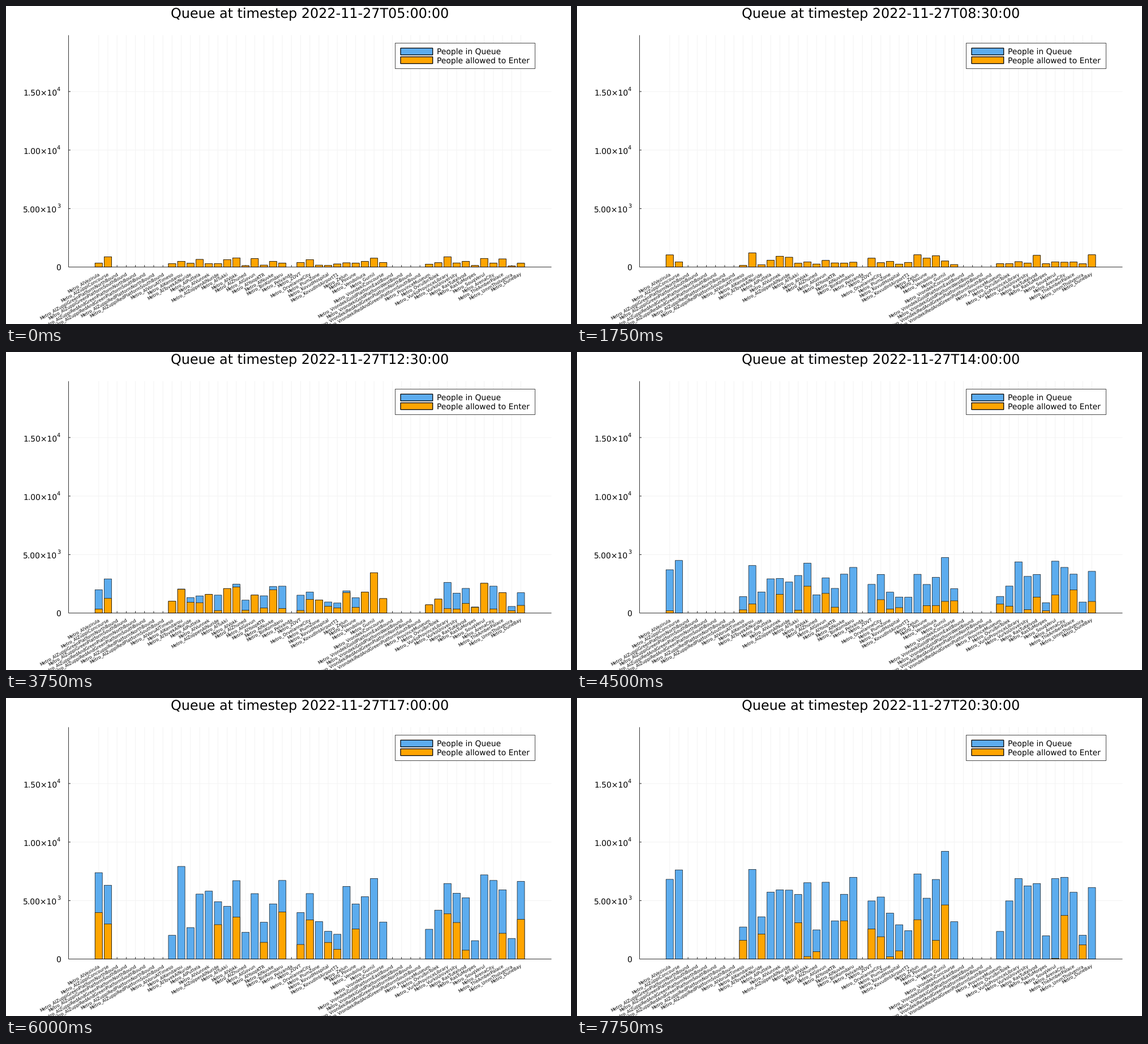
Recreate the animation shown at these times as a matplotlib script. Size 998x561 px, loop 8000 ms.

```python
import matplotlib.pyplot as plt
import numpy as np
from matplotlib.animation import FuncAnimation
from matplotlib.patches import Rectangle

W, H, DPI = 998, 561, 64
PT = 72 / DPI                      # points per pixel
FRAMES, INTERVAL = 32, 250
LEFT, RIGHT, TOP, BASE = 110.5, 963.5, 51.5, 460.5
FIRST_X, STEP_X, BAR_W = 163.7, 16.213, 12.97
PX_PER_PERSON = 103.2 / 5000
BLUE, ORANGE, GRID = "#5cacee", "#ffa500", "#f3f3f3"

plt.rcParams["font.family"] = "DejaVu Sans"
plt.rcParams["text.hinting"] = "no_hinting"
plt.rcParams["path.snap"] = False


def platforms(stop, *lines):
    """Platforms are listed on the axis but carry no passengers."""
    return {f"{stop}{line}Platform{side}Bound": 0
            for line, sides in lines for side in sides}


NS, EW = ("North", "South"), ("East", "West")

# station -> usual evening crowd, in hundreds of people
STATIONS = {
    "AlVezirula": 66, "AlZuppiConcourse": 67,
    **platforms("AlZuppi", ("Green", NS), ("RedAndGreen", NS), ("Red", NS)),
    "AlVoruAlTimeso": 22, "AlKendarou": 71, "AlTovekAlNuride": 29,
    "AlPuttela": 50, "AlVunnek": 53, "AlZoppenAlNuride": 48, "AlTukki": 48,
    "AlVokk": 64, "AlZhuned": 24, "AlGovun": 53, "AlYoopKTR": 32,
    "AlNuvke": 50, "BinKomdaru": 60, "Pelvanda": 0, "ZOVT": 43,
    "OrvelanneCity": 51, "PlumZone": 32, "KovudHospital": 24,
    "KovudIntAirportT1": 23, "Zelun": 60, "Povune": 44, "Vendoliura": 55,
    "Gurnil": 75, "VrondekiConcourse": 31,
    **platforms("Vrondeki", ("Gold", EW), ("RedAndGreen", NS)),
    "ProvinceMuseum": 23, "OvruIbnTolek": 40, "VurkoProvinceLibrary": 65,
    "VurkoUniversity": 51, "RasTuKelvod": 57, "RasTuMorpes": 16,
    "SouqVerul": 67, "ArenaCity": 60, "TheAmberPalace": 53,
    "UmmTholvenira": 17, "DuneBay": 60,
}
crowd = 100 * np.array(list(STATIONS.values()))

rng = np.random.default_rng(27)
size_phase, share_phase = rng.uniform(0, 2 * np.pi, (2, len(crowd)))
size_speed, share_speed = rng.uniform(0.15, 0.4, (2, len(crowd)))


def counts(frame):
    """People waiting and people let in, per station."""
    calm = np.clip((17 - frame) / 6, 0, 1)
    growth = 0.08 + 1.06 / (1 + np.exp((18 - frame) / 3))
    swing = np.sin(size_phase + size_speed * frame)
    queue = crowd * growth * np.exp((0.1 + 0.4 * calm) * swing)
    # everyone enters in the morning, later only a changing share
    share = 0.1 + 1.6 * calm + 0.5 * np.sin(share_phase + share_speed * frame)
    return queue, queue * np.clip(share, 0, 1)


fig = plt.figure(figsize=(W / DPI, H / DPI), dpi=DPI, facecolor="white")
ax = fig.add_axes([0, 0, 1, 1])
ax.set_xlim(0, W)
ax.set_ylim(H, 0)
ax.axis("off")


def line(x0, y0, x1, y1, color="black", width=0.8, z=3):
    ax.plot([x0, x1], [y0, y1], color=color, lw=width * PT, zorder=z,
            solid_capstyle="butt")


def label(x, y, text, size, **kw):
    kw = {"va": "baseline", "ha": "left", "zorder": 5, **kw}
    return ax.text(x, y, text, fontsize=size * PT, **kw)


def box(x, y, w, h, face, width, z):
    return ax.add_patch(Rectangle((x, y), w, h, fc=face, ec="black",
                                  lw=width * PT, zorder=z))


def center(i):
    return FIRST_X + i * STEP_X


# grid, ticks and station names
for i, name in enumerate(STATIONS):
    x = center(i)
    line(x, TOP, x, BASE, GRID, 1, z=0)
    line(x, BASE - 3.5, x, BASE, z=1)
    label(x + 2.2, 474, "Metro_" + name, 7.7, ha="right",
          rotation=30, rotation_mode="anchor")

for count, mantissa, power in ((5000, "5.00", "3"), (10000, "1.00", "4"),
                               (15000, "1.50", "4")):
    y = BASE - count * PX_PER_PERSON
    line(LEFT, y, RIGHT, y, GRID, 1, z=0)
    line(LEFT, y, LEFT + 3.5, y)
    label(90.4, y + 6.5, mantissa + "×10", 13.9, ha="right")
    label(89.8, y - 1.4, power, 9.8)
label(96.6, 465.4, "0", 13.9, ha="right")

line(LEFT, TOP, LEFT, BASE)
line(LEFT, BASE, RIGHT, BASE)

# legend
box(687.5, 65.5, 247, 45, "white", 0.7, 4)
for y, color, text in ((74.3, BLUE, "People in Queue"),
                       (89.6, ORANGE, "People allowed to Enter")):
    box(697, y, 56.7, 12, color, 1.3, 5)
    label(760.7, y + 11.1, text, 13.93)

title = label(537, 21, "", 23.9, ha="center")


def make_bars(color, z):
    return [box(center(i) - BAR_W / 2, BASE, BAR_W, 0, color, 0.65, z)
            for i in range(len(crowd))]


queue_bars = make_bars(BLUE, 2)
enter_bars = make_bars(ORANGE, 2.5)


def draw(frame):
    hour, half = divmod(frame, 2)
    title.set_text(f"Queue at timestep 2022-11-27T{5 + hour:02d}:{30 * half:02d}:00")
    for bars, people in zip((queue_bars, enter_bars), counts(frame)):
        for bar, n in zip(bars, people):
            bar.set_height(-n * PX_PER_PERSON)
            bar.set_visible(n > 0)
    return [title, *queue_bars, *enter_bars]


anim = FuncAnimation(fig, draw, frames=FRAMES, interval=INTERVAL,
                     repeat=True, repeat_delay=0, blit=False)
plt.show()
```
